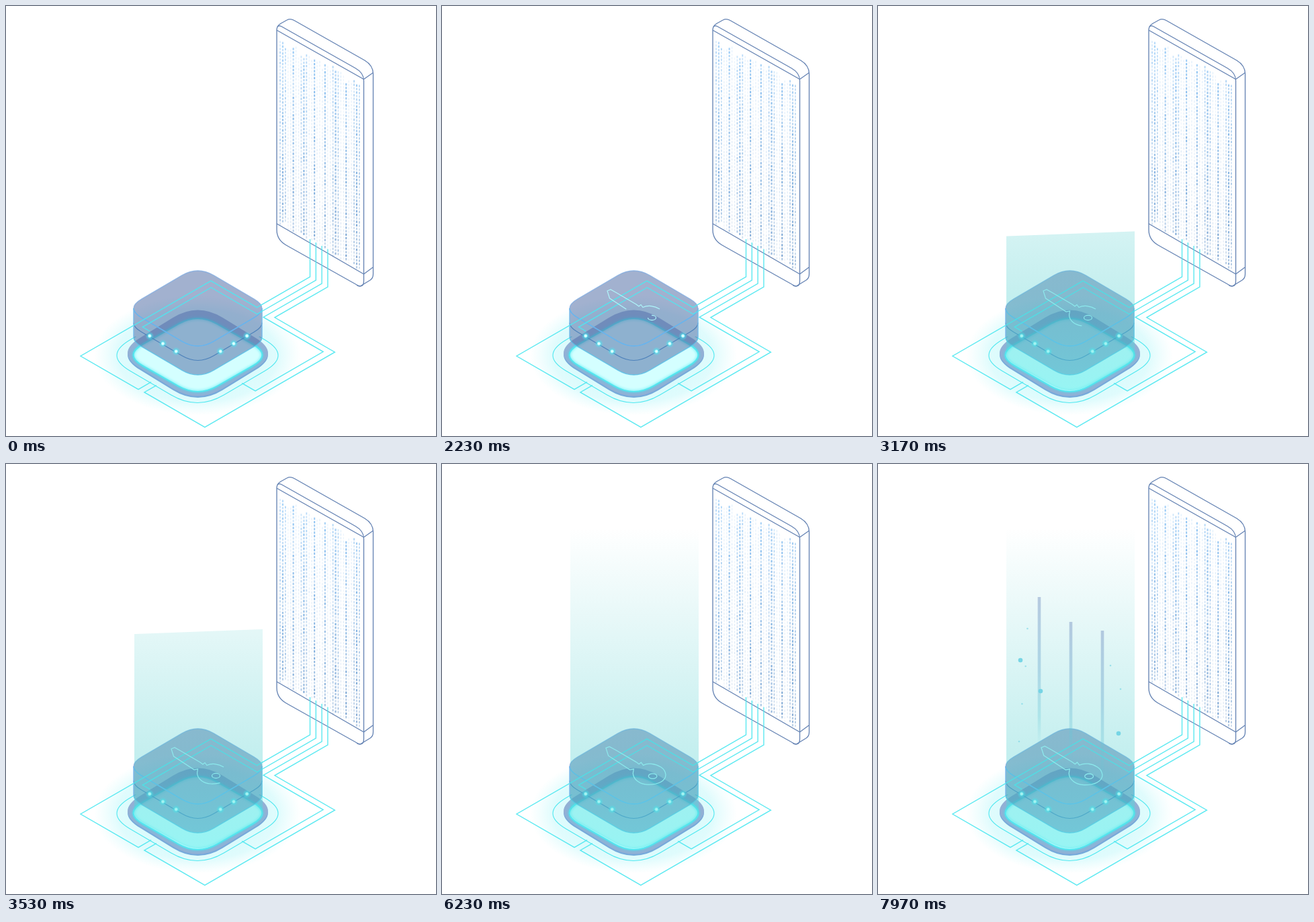
Recreate the animation shown at these times as an HTML page with a canvas. Size 640 by 640 pixels, loop 8 s.

```html
<!DOCTYPE html>
<html>
<head>
<meta charset="utf-8">
<style>
html, body { margin: 0; width: 100%; height: 100%; overflow: hidden; background: #fff; }
canvas { display: block; width: 640px; height: 640px; }
</style>
</head>
<body>
<canvas id="stage" width="640" height="640"></canvas>
<script>
const LOOP = 8000;
const SLOPE = 0.577;
const CYAN = '#4fe8f0';
const stage = document.getElementById('stage').getContext('2d');

const phase = (t, from, to) => Math.min(1, Math.max(0, (t - from) / (to - from)));
const easeOut = u => 1 - Math.pow(1 - u, 1.36);
const swing = u => (1 - Math.cos(Math.PI * u)) / 2;

function noise(n) {
  const s = Math.sin(n * 12.9898 + 4.1) * 43758.5453;
  return s - Math.floor(s);
}

// Rounded rhombus; hw and hh are the half extents after rounding
function rhombus(p, cx, cy, hw, hh, k) {
  const a = hw / (1 - k / 2), b = hh / (1 - k / 2);
  const pts = [[cx - a, cy], [cx, cy - b], [cx + a, cy], [cx, cy + b]];
  const mix = (u, v, f) => [u[0] + (v[0] - u[0]) * f, u[1] + (v[1] - u[1]) * f];
  p.moveTo(...mix(pts[0], pts[3], k));
  pts.forEach((c, i) => {
    const next = pts[(i + 1) % 4];
    p.quadraticCurveTo(...c, ...mix(c, next, k));
    p.lineTo(...mix(next, c, k));
  });
  p.closePath();
  return p;
}
const shape = (...args) => rhombus(new Path2D(), ...args);

function outline(c, path, color, width) {
  c.strokeStyle = color;
  c.lineWidth = width;
  c.stroke(path);
}

// Strokes only the part of a path below y
function rim(c, path, y, color, width) {
  c.save();
  c.beginPath();
  c.rect(0, y, 640, 640);
  c.clip();
  outline(c, path, color, width);
  c.restore();
}

function drawCode(c) {
  for (let i = 0; i < 31; i++) {
    const x = 408 + i * 3.93;
    const beat = (i < 16 ? i : i + 4) % 8;
    const bold = beat === 1 || beat === 5;
    const strong = bold || beat === 0 || beat === 2;
    const w = bold ? 2.2 : strong ? 1.8 : 1.3;
    const top = 43 + (x - 403) * 0.55 + noise(i) * 16;
    const end = 322 + (x - 403) * 0.58 - noise(i + 50) * 8;
    for (let y = top; y < end; y += 5.2) {
      const r = noise(i * 91 + y);
      const f = (y - 50) / 330;
      c.globalAlpha = (bold ? 0.75 : strong ? 0.55 : 0.22) * (0.4 + 0.6 * r);
      c.fillStyle = `rgb(${110 - 25 * f},${182 - 45 * f},${245 - 50 * f})`;
      c.fillRect(x - w / 2, y, w, 3.4);
    }
  }
  c.globalAlpha = 1;
}

function drawPhone(c) {
  drawCode(c);
  [
    'M403 38 Q402.5 26 411 31 L520 92.5 Q532.5 99.5 532.5 111 V409 Q532.5 420 523 415.5 L417 356 Q403 348 403 333 Z',
    'M404 31 Q405 28.5 409 26 L418 21 Q423 18 429 21.5 L534 81 Q546.5 88.5 546.5 101 V399 Q546.5 405 542 408 L529 416 Q526 418.5 522 415.5',
    'M403 36 L532.5 109 L546 99.5',
    'M403 324 L532.5 399 L546 389'
  ].forEach(d => outline(c, new Path2D(d), '#6684b4', 1.35));
}

function drawGlow(c) {
  c.save();
  c.translate(285, 520);
  c.scale(1, 0.58);
  const g = c.createRadialGradient(0, 0, 40, 0, 0, 154);
  g.addColorStop(0, 'rgba(120,240,245,.36)');
  g.addColorStop(0.7, 'rgba(120,240,245,.23)');
  g.addColorStop(1, 'rgba(150,245,248,0)');
  c.fillStyle = g;
  c.fillRect(-160, -160, 320, 320);
  c.restore();
}

function drawBase(c) {
  rim(c, shape(285, 520, 120, 70.5, 0.28), 492, CYAN, 1.1);
  c.fillStyle = '#76aadb';
  c.fill(shape(285.5, 519, 104.5, 64, 0.3));
  c.fillStyle = '#93b0d5';
  c.fill(shape(285.5, 516.5, 104.5, 64, 0.3));
  const plate = shape(285.5, 519.5, 96, 54.5, 0.26);
  c.fillStyle = '#d4ffff';
  c.fill(plate);
  c.save();
  c.shadowColor = '#36e6f0';
  c.shadowBlur = 4;
  outline(c, plate, '#52e6ef', 2.2);
  c.restore();
}

function drawBox(c) {
  const face = y => shape(285.5, y, 95.5, 56, 0.22);
  const body = new Path2D('M190 450 H381 V493 H190 Z');
  body.addPath(face(450));
  body.addPath(face(493));
  c.fillStyle = 'rgba(83,112,166,.54)';
  c.fill(body);
  outline(c, face(450), 'rgba(125,170,225,.75)', 1.3);
  rim(c, face(493), 493, 'rgba(84,190,232,.8)', 1.4);
  rim(c, face(471.5), 471.5, 'rgba(70,125,185,.9)', 1.2);
  rim(c, face(450), 450, '#66b6ef', 1.5);
  outline(c, new Path2D('M190 450 V493 M381 450 V493'), '#76b8ea', 1.4);
}

// Each wire drops from the phone, then alternates between the two floor axes
function drawWires(c) {
  const runs = [
    [79, -68.5, 194, 86, -19],
    [87.5, -68.5, 102, 11],
    [87, 89, 101, -20],
    [79, 89.5, 193.5, -90, -18]
  ];
  c.globalAlpha = 0.92;
  c.strokeStyle = CYAN;
  c.lineWidth = 1.4;
  runs.forEach((run, i) => {
    let x = 452.5 + 8.8 * i, y = 403 + 5 * i;
    c.beginPath();
    c.moveTo(x, 347 + 5 * i);
    c.lineTo(x, y);
    run.forEach((d, j) => {
      x += j % 2 ? d : -d;
      y += d * SLOPE;
      c.lineTo(x, y);
    });
    c.stroke();
  });
  c.globalAlpha = 1;
}

function drawLights(c) {
  for (let i = 0; i < 6; i++) {
    const step = i >> 1, side = i % 2 ? 1 : -1;
    const x = 286.2 + side * (33 + 19.7 * step), y = 514 - 11.5 * step;
    const g = c.createRadialGradient(x, y, 0, x, y, 6.5);
    g.addColorStop(0, '#fff');
    g.addColorStop(0.3, '#b8ffff');
    g.addColorStop(0.5, 'rgba(70,235,245,.5)');
    g.addColorStop(1, 'rgba(70,235,245,0)');
    c.fillStyle = g;
    c.fillRect(x - 8, y - 8, 16, 16);
  }
}

const still = document.createElement('canvas');
still.width = still.height = 640;
{
  const c = still.getContext('2d');
  c.fillStyle = '#fff';
  c.fillRect(0, 0, 640, 640);
  [drawPhone, drawGlow, drawBase, drawBox, drawWires, drawLights].forEach(draw => draw(c));
}

const KEY = 'M324 451 C316 446 306 445 299 448.5 L296 444.5 L293 447 L289 444 L260 427 L251 422 ' +
  'L246 424 L249.5 435 L280 455 L285.5 454 L284.5 460 C285 469 294 475.5 305 476 ' +
  'C320 476.5 331 471 331 462 C330.5 457 328 453.5 324 451';
const keyPath = new Path2D(KEY);
const probe = document.createElementNS('http://www.w3.org/2000/svg', 'path');
probe.setAttribute('d', KEY);
const keyLength = probe.getTotalLength();

function drawKey(c, t) {
  const drawn = easeOut(phase(t, 30, 4670));
  const hole = easeOut(phase(t, 600, 3100));
  if (drawn === 0) return;
  const s = 1 + 0.07 * swing(phase(t, 5800, 6500));
  c.save();
  c.translate(289, 452);
  c.scale(s, s);
  c.translate(-289, -452);
  c.strokeStyle = '#aef5fa';
  c.lineWidth = 1.2;
  if (drawn < 1) c.setLineDash([drawn * keyLength, keyLength * 2]);
  c.stroke(keyPath);
  c.setLineDash([]);
  if (hole > 0) {
    c.beginPath();
    c.ellipse(312.5, 464, 6, 3.6, 0, Math.PI, Math.PI * (1 - 2 * hole), true);
    c.stroke();
  }
  c.restore();
}

function drawBeam(c, t) {
  const rise = phase(t, 2238, 4160);
  if (rise === 0) return;
  const top = 571 - 478 * rise;
  const tilt = 4 * phase(t, 2630, 3170);
  const body = new Path2D('M191 90 H382 V520 H191 Z');
  rhombus(body, 286.5, 519, 95.5, 53, 0.26);
  const g = c.createLinearGradient(0, 95, 0, 571);
  g.addColorStop(0, 'rgba(70,200,200,0)');
  g.addColorStop(0.7, 'rgba(72,205,205,.32)');
  g.addColorStop(1, 'rgba(80,232,230,.46)');
  c.save();
  c.clip(new Path2D(`M180 ${top + tilt} L392 ${top - tilt} V600 H180 Z`));
  c.fillStyle = g;
  c.fill(body);
  c.restore();
}

function drawBars(c, t) {
  const rise = swing(phase(t, 5900, 7180));
  const fall = phase(t, 7200, 7970);
  const shift = 500 * (1 - rise) - 5 + 101 * Math.pow(fall, 1.45);
  const w = 7 - 2.4 * fall;
  for (let i = 0; i < 3; i++) {
    const x = 240 + 47 * i;
    const top = 102 + 49 * i - 12 * i * i + shift;
    const end = 420 + 25 * i;
    if (top >= end) continue;
    const g = c.createLinearGradient(0, top, 0, end);
    g.addColorStop(0, 'rgba(132,158,200,.52)');
    g.addColorStop(0.5, 'rgba(115,175,210,.43)');
    g.addColorStop(0.8, 'rgba(100,200,215,.3)');
    g.addColorStop(1, 'rgba(100,200,215,0)');
    c.fillStyle = g;
    c.fillRect(x - w / 2, top, w, end - top);
  }
}

function drawDots(c, t) {
  const fade = Math.pow(phase(t, 6700, 7800), 1.4);
  const dot = (x, y, r, alpha) => {
    c.globalAlpha = alpha * fade;
    c.beginPath();
    c.arc(x, y, r, 0, Math.PI * 2);
    c.fill();
  };
  c.fillStyle = '#72d3e4';
  dot(212, 292, 3.3, 0.95);
  dot(242, 338, 3.3, 0.95);
  dot(358, 401, 3.3, 0.95);
  for (let i = 0; i < 6; i++) {
    const x = i < 4 ? 208 + 18 * noise(i + 3) : 346 + 15 * (i - 4);
    dot(x, i < 4 ? 245 + 56 * i : 300 + 35 * (i - 4), 1.3, 0.6);
  }
  c.globalAlpha = 1;
}

function render(t) {
  stage.drawImage(still, 0, 0);
  [drawKey, drawBeam, drawBars, drawDots].forEach(draw => draw(stage, t));
}

const start = performance.now();
function tick() {
  render((performance.now() - start) % LOOP);
  requestAnimationFrame(tick);
}
tick();
</script>
</body>
</html>
```
